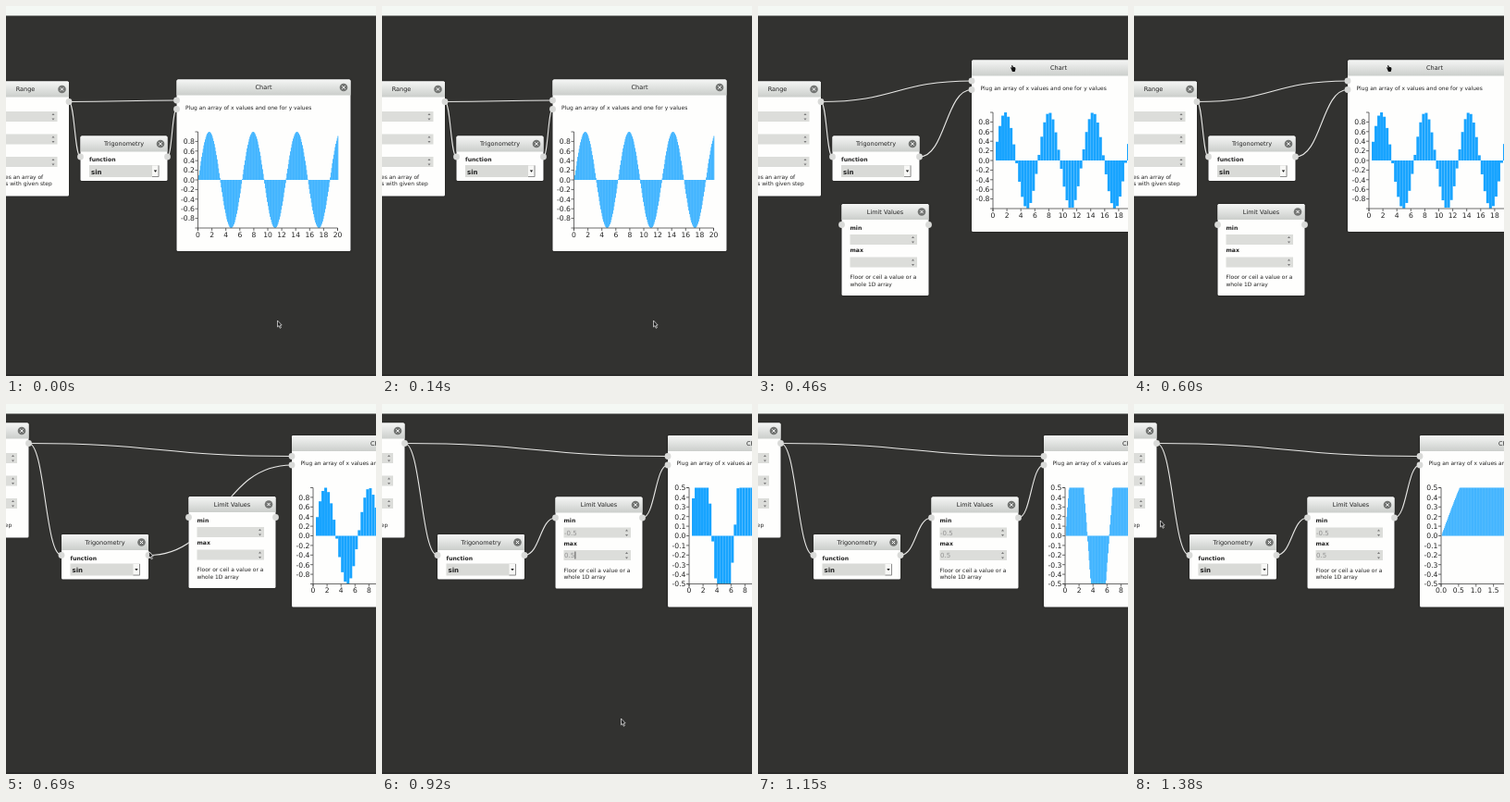
Write an HTML page with a canvas that moves like this. It is 400x400 px and loops after 1.61 s.

```html
<!DOCTYPE html>
<html lang="en">
<head>
<meta charset="utf-8">
<title>Node editor</title>
<style>
html, body { margin: 0; width: 100%; height: 100%; overflow: hidden; background: #323230; }
canvas { display: block; }
</style>
</head>
<body>
<canvas id="stage" width="400" height="400"></canvas>
<script>
const ctx = document.getElementById('stage').getContext('2d');
const FONT = '"DejaVu Sans", sans-serif';
const STEP = 230;

// Node positions are top-left corners.
const before = { range: [-26, 81.5], trig: [80.5, 140.5], chart: [184.5, 79.5] };
const after = { range: [-69.5, 20.5], trig: [60, 141], chart: [309, 34] };
const clipped = { ...after, limit: [187.5, 100.5], linked: true, cap: 0.5, max: 20 };
const scenes = [
  { ...before, cap: 1, max: 20, count: 200, arrow: [293, 340] },
  { ...before, cap: 1, max: 20, count: 50 },
  { ...before, chart: [231, 58.5], limit: [90.5, 214], cap: 1, max: 20, count: 50, hand: [273, 64] },
  { ...after, limit: [197.5, 100], cap: 1, max: 20, count: 50, arrow: [154, 159.5] },
  { ...clipped, count: 50, arrow: [258, 340], caret: true },
  { ...clipped, count: 200 },
  { ...clipped, max: 4, count: 200, arrow: [28, 126] }
];

function rect(x, y, w, h, color) {
  ctx.fillStyle = color;
  ctx.fillRect(x, y, w, h);
}

function text(str, x, y, { size = 5.95, color = '#222', weight = '', align = 'left' } = {}) {
  ctx.font = `${weight} ${size}px ${FONT}`;
  ctx.fillStyle = color;
  ctx.textAlign = align;
  ctx.fillText(str, x, y);
}

function line(points, color, width) {
  ctx.beginPath();
  points.forEach(([x, y]) => ctx.lineTo(x, y));
  ctx.strokeStyle = color;
  ctx.lineWidth = width;
  ctx.stroke();
}

function shape(points, color) {
  ctx.beginPath();
  points.forEach(([x, y]) => ctx.lineTo(x, y));
  ctx.closePath();
  ctx.fillStyle = color;
  ctx.fill();
}

function dot(x, y, r, color) {
  ctx.beginPath();
  ctx.arc(x, y, r, 0, Math.PI * 2);
  ctx.fillStyle = color;
  ctx.fill();
}

function wire([x1, y1], [x2, y2]) {
  const mid = (x1 + x2) / 2;
  ctx.beginPath();
  ctx.moveTo(x1, y1);
  ctx.bezierCurveTo(mid, y1, mid, y2, x2, y2);
  ctx.strokeStyle = '#e8e8e6';
  ctx.lineWidth = 1.1;
  ctx.stroke();
}

function card(title, w, h) {
  ctx.save();
  ctx.shadowColor = 'rgba(0,0,0,.5)';
  ctx.shadowBlur = 2;
  ctx.beginPath();
  ctx.roundRect(0, 0, w, h, 1.5);
  ctx.fillStyle = '#fefefd';
  ctx.fill();
  ctx.restore();
  const shade = ctx.createLinearGradient(0, 0, 0, 17);
  shade.addColorStop(0, '#f5f6f5');
  shade.addColorStop(1, '#cbcecb');
  ctx.beginPath();
  ctx.roundRect(0, 0, w, 17, [1.5, 1.5, 0, 0]);
  ctx.fillStyle = shade;
  ctx.fill();
  text(title, w / 2, 10.8, { size: 6.5, align: 'center' });
  const x = w - 7.5, y = 8.5;
  dot(x, y, 4.3, '#737573');
  line([[x - 1.6, y - 1.6], [x + 1.6, y + 1.6]], '#fff', 1);
  line([[x - 1.6, y + 1.6], [x + 1.6, y - 1.6]], '#fff', 1);
}

function field(y, value = '') {
  rect(9, y, 72.5, 11, '#dcddda');
  shape([[75.5, y + 4], [77, y + 2], [78.5, y + 4]], '#777');
  shape([[75.5, y + 7.5], [77, y + 9.5], [78.5, y + 7.5]], '#777');
  text(value, 9.5, y + 8.3, { size: 7, color: '#919191' });
}

function drawRange() {
  card('Range', 94, 124);
  [32.5, 57, 81.5].forEach(y => field(y));
  text('Creates an array of', 9, 105);
  text('values with given step', 9, 112.5);
}

function drawTrig() {
  card('Trigonometry', 94, 48.5);
  text('function', 9.5, 27.5, { size: 6.1, weight: 'bold' });
  rect(9.5, 31.5, 75.5, 13, '#d9dad7');
  text('sin', 11.5, 41.2, { size: 7, weight: 'bold' });
  rect(77.5, 32, 7, 12, '#f8f8f6');
  line([[77.5, 44], [84.5, 44], [84.5, 32]], '#777', 0.8);
  shape([[79.3, 37], [82.7, 37], [81, 39.2]], '#111');
}

function drawLimit({ linked, caret }) {
  card('Limit Values', 94, 99);
  text('min', 9, 27.5, { size: 6.1, weight: 'bold' });
  field(33, linked ? '-0.5' : '');
  text('max', 9, 52, { size: 6.1, weight: 'bold' });
  field(57.5, linked ? '0.5' : '');
  if (caret) rect(21, 59, 0.8, 8, '#333');
  text('Floor or ceil a value or a', 9, 81);
  text('whole 1D array', 9, 88.5);
}

function drawChart({ cap, max, count }) {
  card('Chart', 188, 185.5);
  text('Plug an array of x values and one for y values', 9.5, 32);
  const left = 23, top = 56.5, bottom = 160.5, zero = 108.5, width = 151;
  const bar = width / count;
  for (let i = 0; i <= count; i++) {
    const v = Math.max(-cap, Math.min(cap, Math.sin(i * max / count)));
    rect(left + i * bar, zero, bar, -v / cap * 52, '#18a4ff');
  }

  const axis = '#444', thin = 0.8;
  line([[left - 3, top], [left, top], [left, bottom], [left - 3, bottom]], axis, thin);
  line([[left, bottom + 3], [left, bottom], [left + width, bottom], [left + width, bottom + 3]], axis, thin);
  const unit = cap / 5, last = cap === 1 ? 4 : 5;
  for (let i = -last; i <= last; i++) {
    const y = zero - i * unit / cap * 52;
    line([[left - 3, y], [left, y]], axis, thin);
    text((i * unit).toFixed(1), left - 3.5, y + 2.8, { size: 7.7, align: 'right' });
  }
  const gap = max === 20 ? 2 : 0.5;
  for (let v = 0; v <= max; v += gap) {
    const x = left + v / max * width;
    line([[x, bottom], [x, bottom + 3]], axis, thin);
    text(v.toFixed(gap < 1 ? 1 : 0), x, bottom + 9.5, { size: 7.6, align: 'center' });
  }
}

function place([x, y], draw) {
  ctx.save();
  ctx.translate(x, y);
  draw();
  ctx.restore();
}

function drawArrow() {
  const points = [[.5, 0], [.5, 7], [2, 5.6], [3.2, 8.3], [4.4, 7.7], [3.2, 5.2], [5.2, 5]];
  shape(points, '#222');
  line([...points, points[0]], '#eee', 0.7);
}

function drawHand() {
  shape([[0, 2.5], [1, 2.3], [2, 3.5], [1, .5], [2, 0], [3, 2], [5, 2.3], [5.5, 4], [4.7, 7], [2, 7]], '#111');
}

function render(s) {
  const port = ([x, y], dx, dy = 22.5) => [x + dx, y + dy];
  const rangeOut = port(s.range, 94, 22);
  const trigIn = port(s.trig, 0), trigOut = port(s.trig, 94);
  const xIn = port(s.chart, 0), yIn = port(s.chart, 0, 32);
  const ports = [rangeOut, trigIn, trigOut, xIn, yIn];

  rect(0, 0, 400, 400, '#323230');
  rect(0, 0, 400, 10.5, '#f4f8f4');
  rect(0, 398, 400, 2, '#2a2a29');

  wire(rangeOut, xIn);
  wire(rangeOut, trigIn);
  if (s.limit) ports.push(port(s.limit, 0), port(s.limit, 94));
  if (s.linked) {
    wire(trigOut, ports[5]);
    wire(ports[6], yIn);
  } else {
    wire(trigOut, yIn);
  }

  place(s.range, drawRange);
  place(s.trig, drawTrig);
  if (s.limit) place(s.limit, () => drawLimit(s));
  place(s.chart, () => drawChart(s));
  ports.forEach(([x, y]) => dot(x, y, 3.4, '#d9dad8'));
  if (s.arrow) place(s.arrow, drawArrow);
  if (s.hand) place(s.hand, drawHand);
}

const start = performance.now();
function tick() {
  const t = (performance.now() - start) % (STEP * scenes.length);
  render(scenes[Math.floor(t / STEP)]);
  requestAnimationFrame(tick);
}
tick();
</script>
</body>
</html>
```
